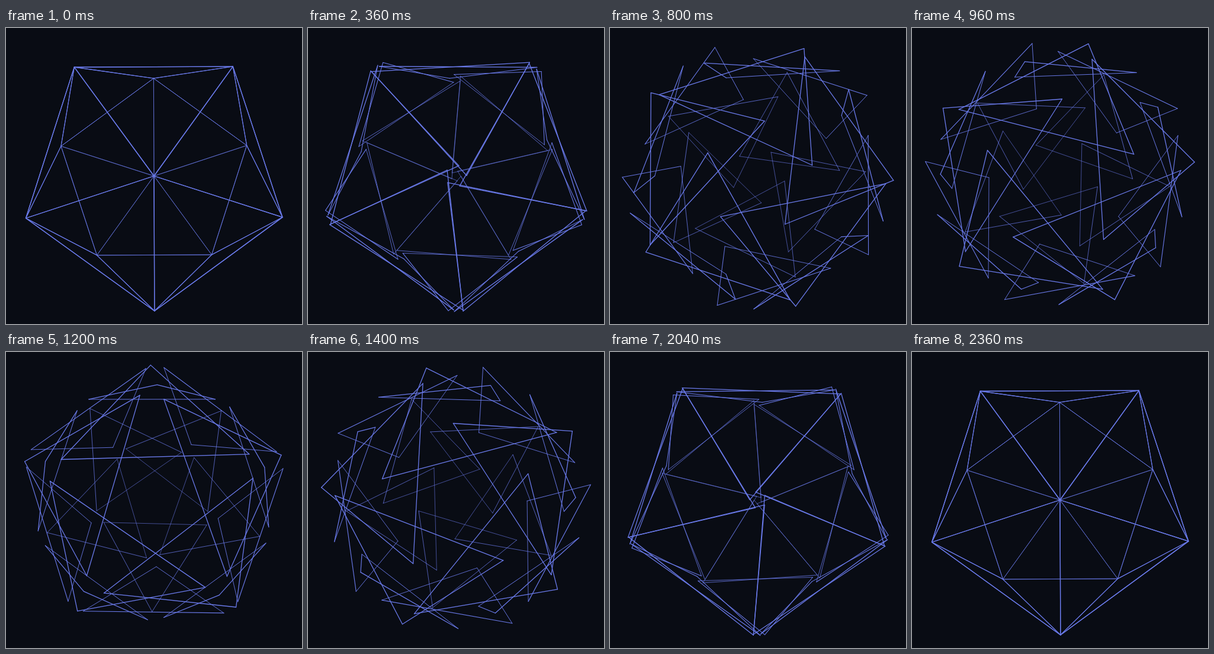
Recreate the animation shown at these times as an HTML page with a canvas. Size 500 by 500 pixels, loop 2400 ms.

```html
<!DOCTYPE html>
<html lang="en">
<head>
<meta charset="utf-8">
<title>Turning icosahedron faces</title>
<style>
  html, body { margin: 0; width: 100%; height: 100%; overflow: hidden; background: #090c14; }
  canvas { display: block; width: 500px; height: 500px; }
</style>
</head>
<body>
<canvas id="stage" width="500" height="500"></canvas>
<script>
const ctx = document.getElementById('stage').getContext('2d');
const LOOP = 2400, TURN_TIME = 2360, TURN = Math.PI * 2 / 3;
const CENTER = 250, CAMERA = 2.79, FOCAL = 597;
const TWIST = -0.0038;

// Unit icosahedron seen along a vertex axis: x right, y down, z to the viewer.
const ring = (start, z) => Array.from({ length: 5 }, (_, i) => {
  const a = start + TWIST + i * Math.PI * 2 / 5, r = 2 / Math.sqrt(5);
  return [r * Math.cos(a), r * Math.sin(a), z];
});
const h = 1 / Math.sqrt(5);
const near = ring(Math.PI / 2, h);
const far = ring(Math.PI / 2 + Math.PI / 5, -h);

const faces = [];
for (let i = 0; i < 5; i++) {
  const j = (i + 1) % 5;
  faces.push(
    [[0, 0, -1], far[i], far[j]],
    [far[i], far[j], near[j]],
    [near[i], near[j], far[i]],
    [[0, 0, 1], near[i], near[j]]
  );
}

const cross = (a, b) => [
  a[1] * b[2] - a[2] * b[1],
  a[2] * b[0] - a[0] * b[2],
  a[0] * b[1] - a[1] * b[0]
];

// Split each face into its centre, spokes and the spokes turned a quarter.
const parts = faces.map(face => {
  const c = [0, 1, 2].map(k => (face[0][k] + face[1][k] + face[2][k]) / 3);
  const len = Math.hypot(...c);
  const n = c.map(v => v / len);
  return face.map(v => {
    const spoke = v.map((x, k) => x - c[k]);
    return { c, spoke, side: cross(spoke, n) };
  });
});

// cubic-bezier(.45, 0, .55, 1)
function ease(x) {
  let lo = 0, hi = 1;
  for (let i = 0; i < 30; i++) {
    const s = (lo + hi) / 2, q = 1 - s;
    const bx = 1.35 * q * q * s + 1.65 * q * s * s + s * s * s;
    if (bx < x) lo = s; else hi = s;
  }
  return lo * lo * (3 - 2 * lo);
}

function project([x, y, z]) {
  const s = FOCAL / (CAMERA - z);
  return { x: CENTER + x * s, y: CENTER + y * s, z };
}

function draw(ms) {
  const angle = TURN * ease(Math.min(1, (ms % LOOP) / TURN_TIME));
  const cos = Math.cos(angle), sin = Math.sin(angle);
  ctx.fillStyle = '#090c14';
  ctx.fillRect(0, 0, 500, 500);
  ctx.strokeStyle = '#6a7aea';
  ctx.lineCap = 'round';
  for (const part of parts) {
    const pts = part.map(({ c, spoke, side }) =>
      project(c.map((v, k) => v + spoke[k] * cos + side[k] * sin)));
    pts.forEach((a, i) => {
      const b = pts[(i + 1) % 3], depth = (a.z + b.z) / 2;
      ctx.lineWidth = Math.min(1.3, Math.max(0.6, 1.05 + 0.55 * depth));
      ctx.beginPath();
      ctx.moveTo(a.x, a.y);
      ctx.lineTo(b.x, b.y);
      ctx.stroke();
    });
  }
}

const start = performance.now();
function tick() {
  draw(performance.now() - start);
  requestAnimationFrame(tick);
}
draw(0);
requestAnimationFrame(tick);
</script>
</body>
</html>
```
